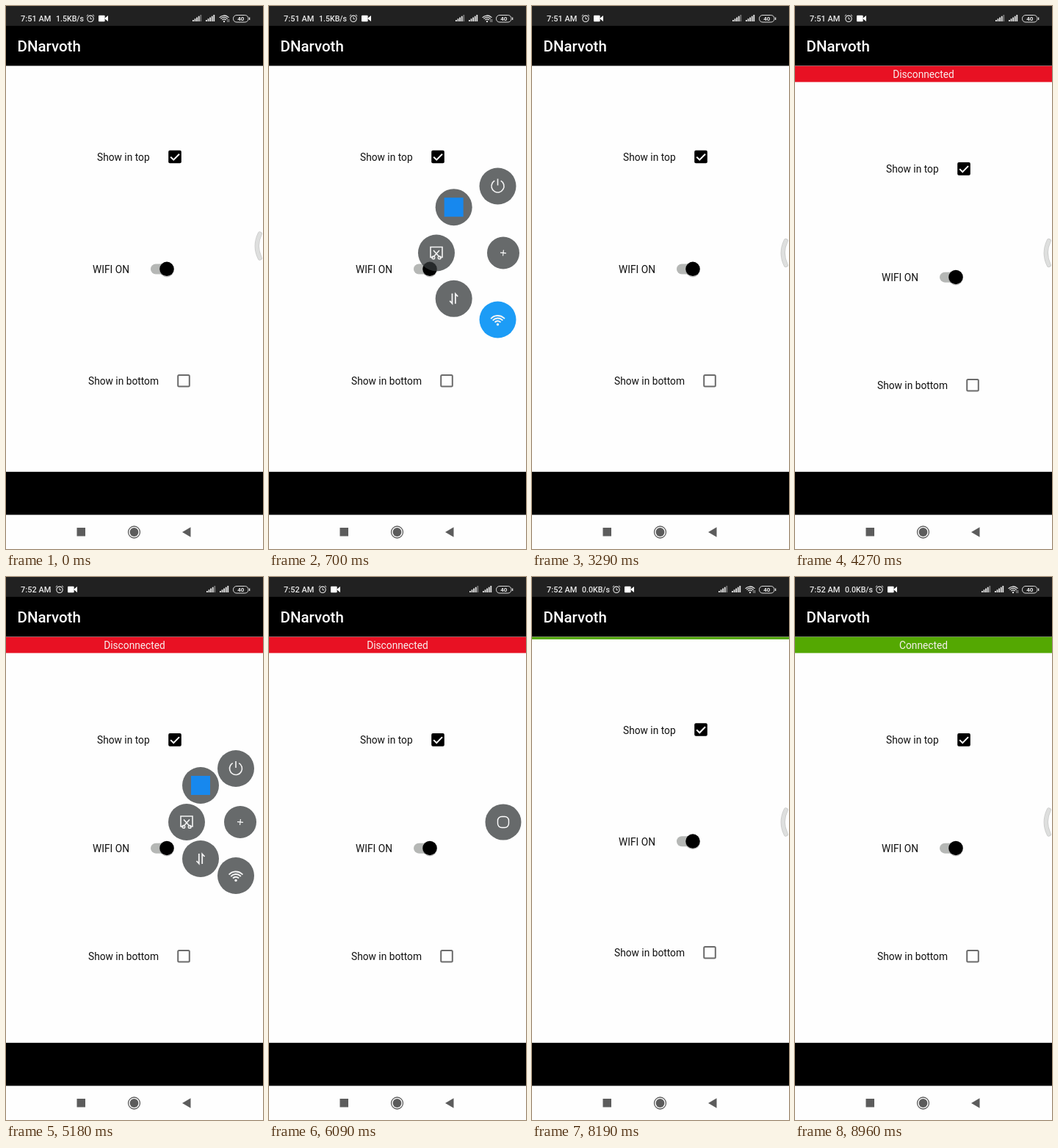
Animation, 350 px wide and 740 px high, one loop 9.1 s. Source, as an HTML page with a canvas:

```html
<!DOCTYPE html>
<html lang="en">
<head>
<meta charset="utf-8">
<title>Network banner</title>
<style>
html, body { margin: 0; width: 350px; height: 740px; overflow: hidden; background: #fefefe; }
canvas { display: block; }
</style>
</head>
<body>
<canvas id="stage" width="350" height="740"></canvas>
<script>
const c = document.getElementById('stage').getContext('2d');
const LOOP = 9100, STEP = 70;
const HEADER_END = 81.5, BANNER = 22.3, LABEL = 13.75;
const GLASS = 'rgba(52,56,58,.75)', ICON = '#f4f4f4';

const ramp = (t, a, b) => Math.min(1, Math.max(0, (t - a) / (b - a)));
const smooth = u => u * u * (3 - 2 * u);
const overshoot = u => 1 + 4 * (u - 1) ** 3 + 3 * (u - 1) ** 2;

function rect(x, y, w, h, color) {
  c.fillStyle = color;
  c.fillRect(x, y, w, h);
}
function round(x, y, w, h, r) {
  c.beginPath();
  c.roundRect(x, y, w, h, r);
}
function disc(x, y, r, color) {
  c.fillStyle = color;
  c.beginPath();
  c.arc(x, y, r, 0, 7);
  c.fill();
}
function ring(x, y, r, color, width, from = 0, to = Math.PI * 2) {
  c.strokeStyle = color;
  c.lineWidth = width;
  c.beginPath();
  c.arc(x, y, r, from, to);
  c.stroke();
}
function line(d, color, width) {
  c.strokeStyle = color;
  c.lineWidth = width;
  c.stroke(new Path2D(d));
}
function fill(d, color) {
  c.fillStyle = color;
  c.fill(new Path2D(d));
}
function text(s, x, y, size, color, weight = 400, align = 'left') {
  c.font = `${weight} ${size}px Roboto, sans-serif`;
  c.textAlign = align;
  c.fillStyle = color;
  c.fillText(s, x, y);
}
function at(x, y, draw) {
  c.save();
  c.translate(x, y);
  draw();
  c.restore();
}

// Wi-Fi fan whose dot sits at the origin
function wifi(size, color) {
  const a = -Math.PI * .77, b = -Math.PI * .23;
  for (const k of [.42, .72, 1]) ring(0, 0, size * k, color, size * .15, a, b);
  disc(0, -size * .05, size * .14, color);
}

function signal(x, lit) {
  for (let i = 0; i < 5; i++) {
    const h = 2 + i * 1.75;
    rect(x + i * 2.6, 21 - h, 1.8, h, i < lit ? '#e8e8e8' : '#777');
  }
}

function statusBar(t) {
  rect(0, 0, 350, 27, '#212121');
  const online = t < 1890 || t >= 7420;
  const speed = t < 2520 || t >= 7420;
  const ink = '#e8e8e8';
  text(t < 4620 ? '7:51 AM' : '7:52 AM', 20, 21, 11, ink, 500);
  if (speed) text(t < 910 ? '1.5KB/s' : '0.0KB/s', 68, 21, 10.6, ink, 500);
  at(speed ? 115 : 73, 17, () => {
    ring(0, .3, 4.2, ink, 1.1);
    line('M0 -2V.7H2M-5.3 -3.2L-3 -5.2M5.3 -3.2L3 -5.2', ink, 1);
  });
  at(speed ? 126 : 84, 17, () => {
    c.fillStyle = '#fff';
    round(0, -4.2, 8.6, 8.4, 1);
    c.fill();
    fill('M8 0L13 -4V4Z', '#fff');
  });
  const x = online ? 254 : 273;
  signal(x, 4);
  signal(x + 18, 5);
  if (online) {
    at(297, 21.5, () => wifi(8.5, ink));
    line('M301.7 18V22M303.6 18V22', '#aaa', .9);
  }
  c.strokeStyle = '#ddd';
  c.lineWidth = 1;
  round(309.5, 12.5, 20.5, 9.5, 4.5);
  c.stroke();
  rect(331, 15.5, 1.3, 3.5, '#ddd');
  text('40', 319.8, 20.3, 8, ink, 700, 'center');
}

function checkbox(x, y, on) {
  if (on) {
    c.fillStyle = '#000';
    round(x, y, 17.6, 17.6, 2);
    c.fill();
    line(`M${x + 3} ${y + 9}l4 4 7.8 -8`, '#fff', 2);
  } else {
    c.strokeStyle = '#6b6b6b';
    c.lineWidth = 2;
    round(x + 1, y + 1, 15.6, 15.6, 1.5);
    c.stroke();
  }
}

function content(h) {
  at(0, h * .735, () => {
    text('Show in top', 124, 211, LABEL, '#111');
    checkbox(221.2, 196.7, true);
  });
  at(0, h * .5, () => {
    text('WIFI ON', 118, 364, LABEL, '#111');
    c.fillStyle = '#b5b7b5';
    round(197, 351.5, 28, 14, 7);
    c.fill();
    disc(219, 359.4, 10, 'rgba(0,0,0,.25)');
    disc(219, 358.3, 9.7, '#000');
  });
  at(0, h * .265, () => {
    text('Show in bottom', 112, 516, LABEL, '#111');
    checkbox(233.2, 502, false);
  });
}

function banner(t, h) {
  if (h <= 0) return;
  const connected = t >= 8000;
  c.save();
  c.beginPath();
  c.rect(0, HEADER_END, 350, h);
  c.clip();
  rect(0, HEADER_END, 350, h, connected ? '#54a802' : '#e81123');
  text(connected ? 'Connected' : 'Disconnected', 175, 98, LABEL, '#f8f0ee', 400, 'center');
  c.restore();
}

function navBar() {
  rect(0, 634.8, 350, 58.6, '#000');
  const grey = '#5c5c5c';
  rect(96.5, 711, 11.5, 11.5, grey);
  ring(174.5, 717, 8, grey, 1.3);
  disc(174.5, 717, 5.9, grey);
  fill('M240 717L251.5 710.3V723.7Z', grey);
}

const tools = [
  [-6, -73, () => {
    ring(0, 0, 8.5, ICON, 1.6, -1.05, Math.PI + 1.05);
    line('M0 -10V-1', ICON, 1.6);
  }],
  [-54, -50, () => rect(-13, -13, 26, 26, '#1788ee')],
  [-73, 0, () => {
    line('M-4 6H-8V-8H8V6H4M-4 -3.5L3.6 5M4 -3.5L-3.6 5', ICON, 1.6);
    ring(-4.2, 6.4, 1.9, ICON, 1.4);
    ring(4.2, 6.4, 1.9, ICON, 1.4);
  }],
  [-54, 50, () => line('M-2.2 -7V6.5L-5.5 3M2.2 7V-6.5L5.5 -3', ICON, 1.8)],
  [-6, 73, () => at(0, 7, () => wifi(12.5, ICON))]
];

function handle(y, shown) {
  c.save();
  c.globalAlpha = shown;
  c.translate((1 - shown) * 10, y);
  c.lineCap = 'round';
  const curve = 'M345.7 -16.5Q337.8 0 345.7 16.5';
  line(curve, '#c9cac9', 6.2);
  line(curve, '#dedfde', 4.6);
  c.restore();
}

function ball(y, shown, dim, fan, wifiOn) {
  const open = Math.min(1, Math.max(0, fan));
  const x = 319 + (1 - shown) * 22;
  c.save();
  c.globalAlpha = shown * (1 - dim * .5);
  if (fan > .005) tools.forEach(([dx, dy, icon], i) => {
    at(x + dx * fan, y + dy * fan, () => {
      disc(0, 0, 25, i === 4 && wifiOn ? '#1c9cf6' : GLASS);
      icon();
    });
  });
  at(x, y, () => {
    disc(0, 0, 24.5 - 2.5 * open, GLASS);
    const alpha = c.globalAlpha;
    c.globalAlpha = alpha * (1 - open);
    c.strokeStyle = '#fff';
    c.lineWidth = 1.4;
    round(-7.5, -7.5, 15, 15, 5.5);
    c.stroke();
    c.globalAlpha = alpha * open;
    c.rotate(.1 - (1 - open) * .8);
    line('M-4 0H4M0 -4V4', '#fff', 1.1);
  });
  c.restore();
}

function draw(t) {
  const h = BANNER * (smooth(ramp(t, 3360, 3920)) - ramp(t, 7700, 7840) + smooth(ramp(t, 8050, 8610)));
  const shown = ramp(t, 70, 280) - ramp(t, 2870, 3080) + ramp(t, 4270, 4480) - ramp(t, 7070, 7280);
  const second = t >= 4200;
  const dim = second ? ramp(t, 6580, 6790) : ramp(t, 2380, 2590);
  const [openAt, closeAt] = second ? [4670, 5850] : [540, 1640];
  const fan = overshoot(t < closeAt ? ramp(t, openAt, openAt + 300) : 1 - ramp(t, closeAt, closeAt + 184));

  rect(0, 0, 350, 740, '#fefefe');
  rect(0, 27, 350, HEADER_END - 27, '#000');
  statusBar(t);
  text('DNarvoth', 15.5, 62, 20.5, '#fff', 500);
  content(h);
  banner(t, h);
  navBar();
  if (shown < 1) handle(t < 1000 ? 327 : t < 5000 ? 336.5 : 334, 1 - shown);
  if (shown > 0) ball(second ? 334 : 336.5, shown, dim, fan, !second);
}

const start = performance.now();
function tick() {
  const t = (performance.now() - start) % LOOP;
  draw(Math.floor(t / STEP) * STEP);
  requestAnimationFrame(tick);
}
tick();
</script>
</body>
</html>
```
